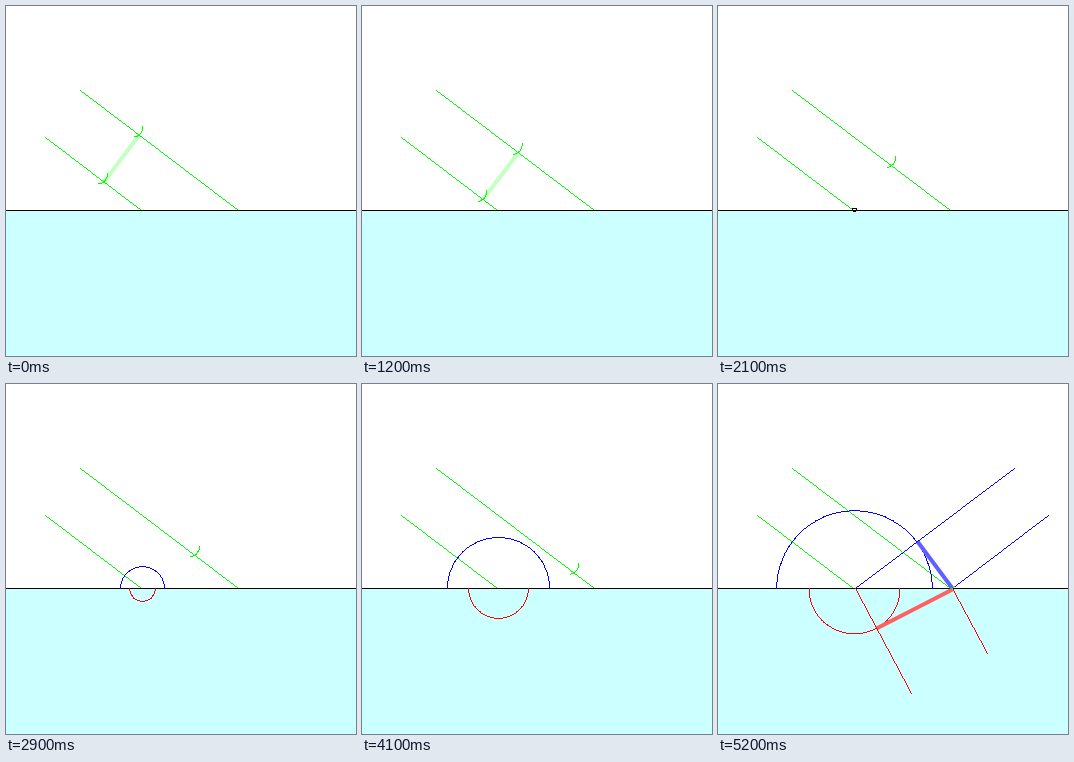
These frames come from a looping animation (350 px wide and 350 px high, 8000 ms). An HTML page with a canvas:

```html
<!DOCTYPE html>
<html lang="en">
<head>
<meta charset="utf-8">
<title>Wavefront at a boundary</title>
<style>
  html, body { margin: 0; height: 100%; overflow: hidden; background: #fff; }
  canvas { display: block; width: 100vw; height: 100vh; image-rendering: pixelated; }
</style>
</head>
<body>
<canvas width="350" height="350"></canvas>
<script>
const ctx = document.querySelector('canvas').getContext('2d');
const LOOP = 8000, STEP = 100, HIT = 20, END = 52;
const GREEN = '#00ff00', BLUE = '#0000ff', RED = '#ff0000';
const SURFACE = 204, SOURCE_X = 136;

function dot(x, y) {
  ctx.fillRect(Math.round(x), Math.round(y), 1, 1);
}

// Thin shapes are plotted pixel by pixel to stay free of antialiasing.
function line(color, x1, y1, x2, y2) {
  ctx.fillStyle = color;
  const n = Math.max(Math.abs(x2 - x1), Math.abs(y2 - y1));
  for (let i = 0; i <= n; i++) dot(x1 + (x2 - x1) * i / n, y1 + (y2 - y1) * i / n);
}

function arc(color, cx, cy, r, from, to) {
  ctx.fillStyle = color;
  const n = Math.ceil(r * (to - from));
  for (let i = 0; i <= n; i++) {
    const a = from + (to - from) * i / n;
    dot(cx + r * Math.cos(a), cy + r * Math.sin(a));
  }
}

function band(color, x1, y1, x2, y2) {
  ctx.strokeStyle = color;
  ctx.lineWidth = 4;
  ctx.beginPath();
  ctx.moveTo(x1 + .5, y1 + .5);
  ctx.lineTo(x2 + .5, y2 + .5);
  ctx.stroke();
}

// Small wavelet around a point of the incoming front
function wavelet(x, y) {
  arc(GREEN, x - 6.2, y - 8.4, 10, -.05, 1.42);
}

function draw(n) {
  ctx.fillStyle = '#fff';
  ctx.fillRect(0, 0, 350, 350);
  ctx.fillStyle = '#ccffff';
  ctx.fillRect(0, SURFACE, 350, 350 - SURFACE);

  const dx = 1.95 * n, dy = 1.44 * n;
  const low = [97 + dx, 176 + dy], high = [132.5 + dx, 129 + dy];
  if (n <= HIT) band('#c4ffc4', ...low, ...high);

  line(GREEN, 74, 84, 232, SURFACE);
  line(GREEN, 39, 131, 135, SURFACE);
  if (n <= HIT) wavelet(...low);
  if (n < END) wavelet(...high);
  line('#000', 0, SURFACE, 349, SURFACE);

  const age = n - HIT;
  if (age > 0) {
    const tiny = age === 1;
    arc(tiny ? '#000' : BLUE, SOURCE_X, SURFACE, 2.43 * age, Math.PI, 2 * Math.PI);
    arc(tiny ? '#000' : RED, SOURCE_X, SURFACE, 1.42 * age, 0, Math.PI);
  }

  if (n === END) {
    band('#6060ff', 199, 157, 234, SURFACE);
    band('#ff6060', 158, 244, 234, 205);
    line(BLUE, 137, SURFACE, 296, 84);
    line(BLUE, 234, SURFACE, 330, 131);
    line(RED, 137, SURFACE, 193, 309);
    line(RED, 234, SURFACE, 269, 269);
    line(GREEN, 232, 205, 236, 202);
  }
}

const start = performance.now();
function tick() {
  const t = (performance.now() - start) % LOOP;
  draw(Math.min(END, Math.floor(t / STEP)));
  requestAnimationFrame(tick);
}
tick();
</script>
</body>
</html>
```
